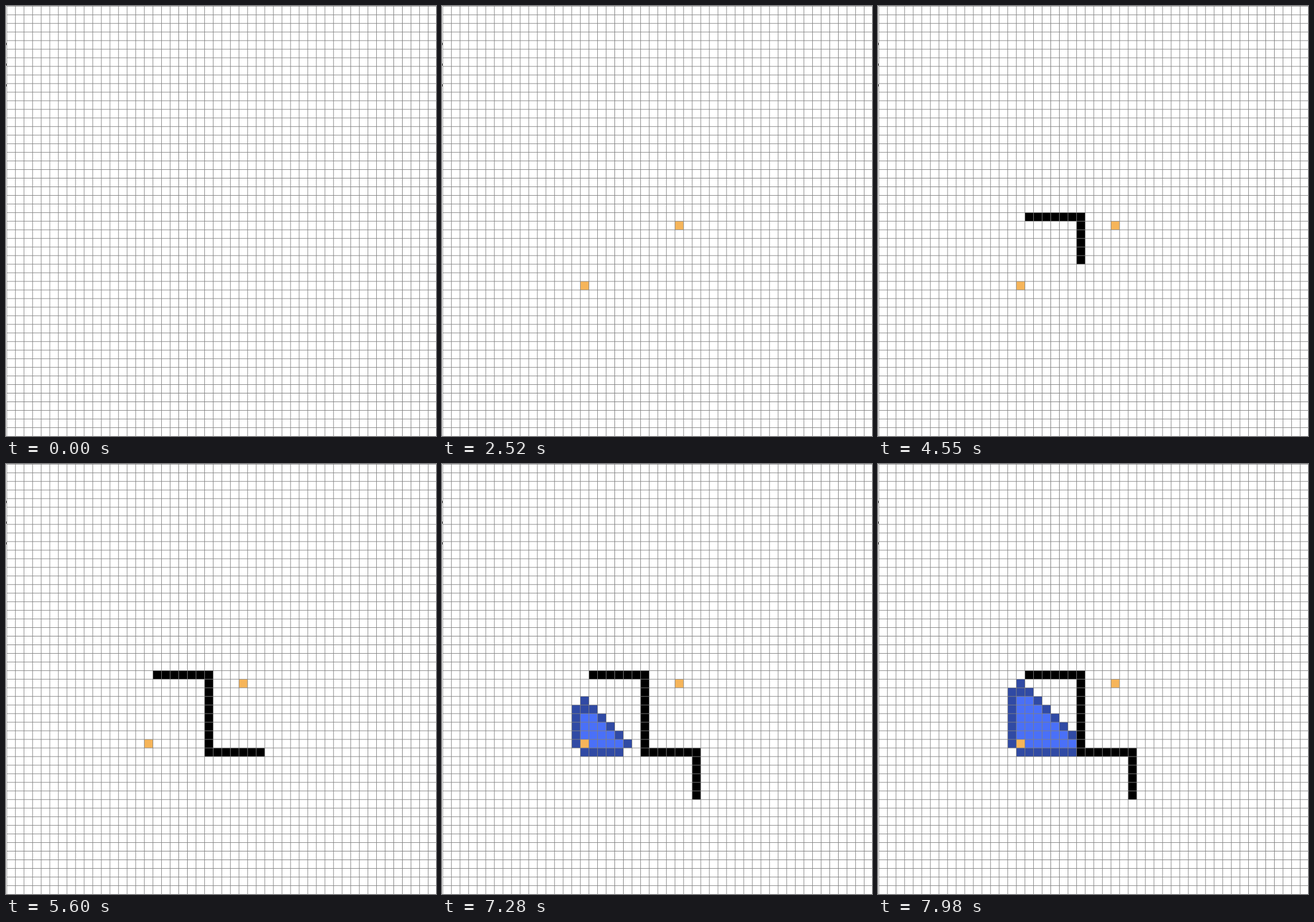
Write an HTML page with a canvas that moves like this. It is 748 px wide and 748 px high and loops after 8000 ms.

```html
<!DOCTYPE html>
<html lang="en">
<head>
<meta charset="utf-8">
<title>Grid path search</title>
<style>
  html, body { margin: 0; width: 100%; height: 100%; overflow: hidden; background: #fff; }
  canvas { display: block; width: 748px; height: 748px; }
</style>
</head>
<body>
<canvas id="stage" width="748" height="748"></canvas>
<script>
const SIZE = 748, COUNT = 50, CELL = 16, BOARD = COUNT * CELL;
const LEFT = 0.85, TOP = -0.15;
const LOOP = 8000, TICK = 70, SEARCH_START = 6650;
const LINE = '#808080', WALL = '#000', GOAL = '#f6b55a', OPEN = '#304aa4', CLOSED = '#4a70f8';

const stage = document.getElementById('stage').getContext('2d');
stage.imageSmoothingQuality = 'high';

// The board is drawn on whole pixels, then scaled smoothly to the stage
const board = document.createElement('canvas');
board.width = board.height = BOARD;
const ctx = board.getContext('2d');

const start = { c: 16, r: 32, at: 1260 };
const end = { c: 27, r: 25, at: 2170 };

// Each wall is dragged at an even pace from one time to another
const walls = [];
function drag(c, r, dc, dr, n, from, to) {
  for (let i = 0; i < n; i++) {
    walls.push({ c: c + dc * i, r: r + dr * i, at: from + (to - from) * i / (n - 1) });
  }
}
drag(17, 24, 1, 0, 7, 3010, 3710);
drag(23, 25, 0, 1, 9, 4130, 4900);
drag(24, 33, 1, 0, 6, 5180, 5600);
drag(29, 34, 0, 1, 5, 6020, 6300);

// Search order: the start, then each diagonal from bottom right to top left
const order = [];
for (let d = 0; d <= 6; d++) {
  for (let j = 0; j <= d; j++) order.push([start.c + d - j, start.r - j]);
}

function fillCell(c, r, color) {
  ctx.fillStyle = color;
  ctx.fillRect(c * CELL, r * CELL, CELL, CELL);
}

function drawSearch(t) {
  if (t < SEARCH_START) return;
  // The search slows slightly as it spreads
  const u = (t - SEARCH_START) / TICK - 2;
  const n = Math.min(order.length, Math.floor(4.4 + 1.66 * u - 0.015 * u * u));
  for (const [c, r] of order.slice(0, n)) {
    for (const side of [-1, 1]) {
      fillCell(c + side, r, OPEN);
      fillCell(c, r + side, OPEN);
    }
  }
  // The newest cell closes one step later
  for (const [c, r] of order.slice(0, n - 1)) fillCell(c, r, CLOSED);
}

function drawLines() {
  ctx.fillStyle = LINE;
  for (let p = 0; p < BOARD; p += CELL) {
    ctx.fillRect(p, 0, 1, BOARD);
    ctx.fillRect(0, p, BOARD, 1);
  }
}

function drawStage() {
  stage.fillStyle = '#fff';
  stage.fillRect(0, 0, SIZE, SIZE);
  stage.drawImage(board, LEFT, TOP, SIZE, SIZE);
  // Dark specks along the left edge
  stage.fillStyle = '#444';
  for (let y = 64; y <= 136; y += 36) stage.fillRect(0, y, 1, 4);
}

function draw(time) {
  const t = Math.floor(time / TICK) * TICK;
  ctx.fillStyle = '#fff';
  ctx.fillRect(0, 0, BOARD, BOARD);
  drawSearch(t);
  for (const w of walls) if (t >= w.at) fillCell(w.c, w.r, WALL);
  for (const g of [start, end]) if (t >= g.at) fillCell(g.c, g.r, GOAL);
  drawLines();
  drawStage();
}

const began = performance.now();
function tick() {
  draw((performance.now() - began) % LOOP);
  requestAnimationFrame(tick);
}
tick();
</script>
</body>
</html>
```
